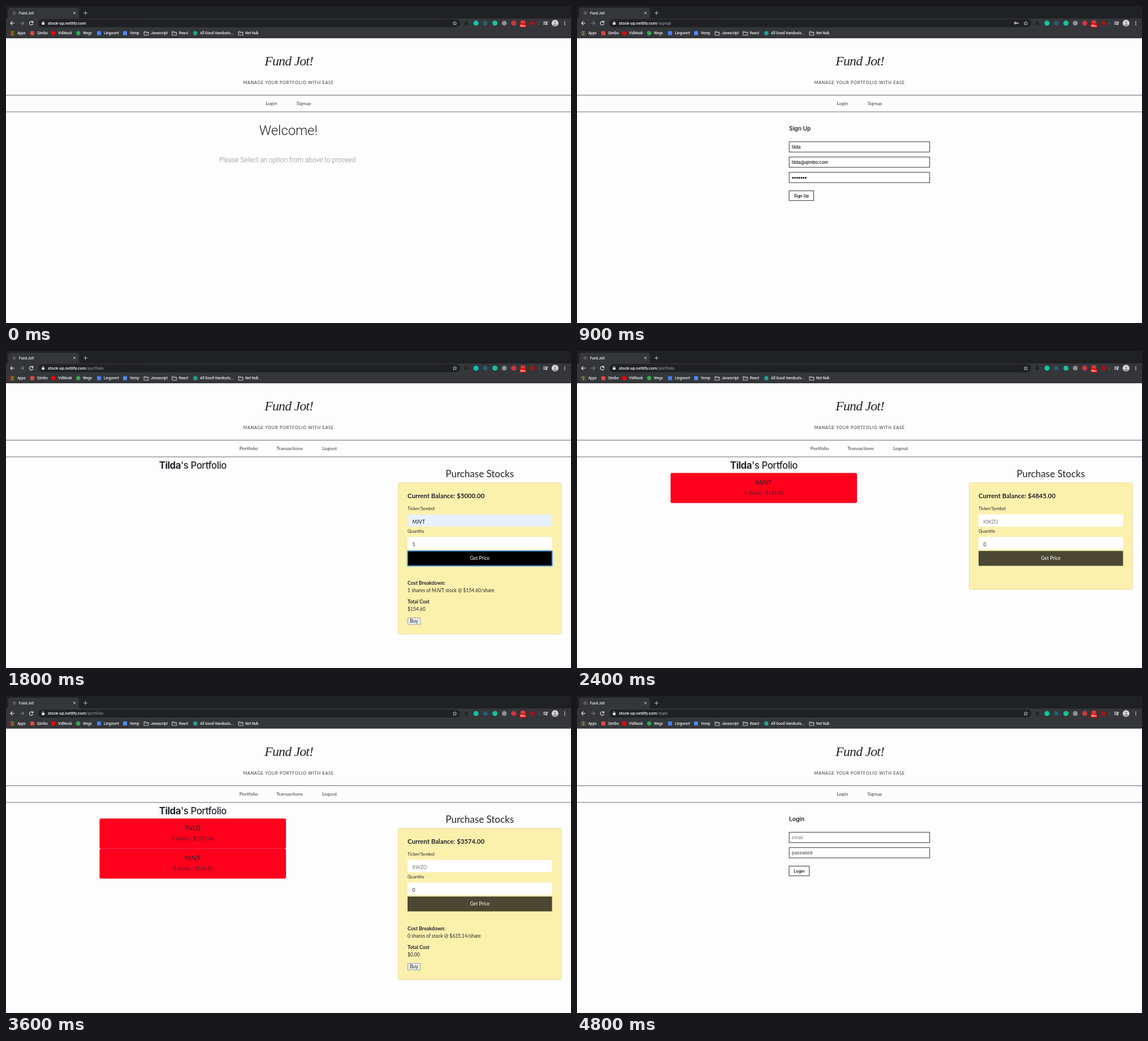
Recreate the animation shown at these times as an HTML page. Size 999x560 px, loop 5.1 s.

```html
<!DOCTYPE html>
<html lang="en">
<head>
<meta charset="utf-8">
<title>Fund Jot!</title>
<style>
  html, body { margin: 0; width: 100%; height: 100%; overflow: hidden; background: #fdfdfd; }
  svg { display: block; width: 999px; height: 560px; }
  text { white-space: pre; }
  .ui { font-family: Roboto, sans-serif; }
  .sf { font-family: Inter, sans-serif; }
  .av { font-family: Lato, sans-serif; }
  .title { font-family: "Liberation Serif", serif; font-style: italic; letter-spacing: -.8px; }
  .tag { font-family: Lato, sans-serif; letter-spacing: .85px; }
  .nav { font-family: Lato, sans-serif; letter-spacing: .1px; }
  .head { font-family: Inter, sans-serif; letter-spacing: -.4px; }
</style>
</head>
<body>
<svg id="stage" viewBox="0 0 999 560"></svg>
<script>
const INK = '#212529', MID = 499.3;
const USER = 'Tilda', MAIL = 'tilda@qimbo.com', APP = 'Fund Jot!';
const FIRST = 'MJVT', SECOND = 'TVLO', HINT = 'KWZO';
const HOST = 'stock-up.netlify.com';

const text = (x, y, s, size, cls, fill = INK, more = '') =>
  `<text x="${x}" y="${y}" font-size="${size}" class="${cls}" fill="${fill}" ${more}>${s}</text>`;
const center = (x, y, s, size, cls, fill, more = '') =>
  text(x, y, s, size, cls, fill, 'text-anchor="middle" ' + more);
const rect = (x, y, w, h, fill, more = '') =>
  `<rect x="${x}" y="${y}" width="${w}" height="${h}" fill="${fill}" ${more}/>`;
const dot = (x, y, r, fill) => `<circle cx="${x}" cy="${y}" r="${r}" fill="${fill}"/>`;
const line = (d, stroke, width = 1) =>
  `<path d="${d}" fill="none" stroke="${stroke}" stroke-width="${width}"/>`;
const shift = (dy, s) => `<g transform="matrix(1 0 0 1 0 ${dy})">${s}</g>`;
const bold = w => `font-weight="${w}"`;

function tabStrip() {
  return rect(0, 0, 999, 22, '#202124') +
    '<path d="M1 22q3 0 3-3V7q0-4 4-4H125q4 0 4 4v12q0 3 3 3z" fill="#35363a"/>' +
    dot(14.5, 12.4, 3.2, '#55575b') +
    text(23, 14.5, APP, 6.3, 'ui', '#e8eaed', bold(500)) +
    line('M119 10.3l4 4m0-4l-4 4', '#e8eaed', .9) +
    line('M137 12.3h7m-3.5-3.5v7', '#c4c7ca', .9);
}

function bookmark(x, label, color, shape) {
  const icon = shape === 'folder'
    ? line(`M${x} 45h3l1 1.2h4v5.3h-8z`, '#d5d7da', .9) + line(`M${x} 47.2h8`, '#d5d7da', .7)
    : shape === 'square' ? rect(x, 44.5, 7, 7, color, 'rx="1"') : dot(x + 3.7, 48, 3.8, color);
  return icon + text(x + 12, 50.3, label, 6.4, 'ui', '#e8eaed', bold(500));
}

function toolbar(path, key) {
  let s = rect(0, 21, 999, 36, '#35363a') + rect(57, 23.3, 746, 14.2, '#202124', 'rx="7.1"');
  s += line('M15 30.2H8m3.2-3.3L8 30.2l3.2 3.3', '#e8eaed', 1.1);
  s += line('M24.5 30.2h7m-3.2-3.3l3.2 3.3-3.2 3.3', '#7c7e82', 1.1);
  s += line('M47 28.2a3.2 3.2 0 1 0 .7 3M47.7 26.5v2.6h-2.6', '#e8eaed', 1.1);
  s += rect(63.3, 29.3, 4.8, 3.8, '#e8eaed', 'rx=".5"') + line('M64.3 29.5v-1a1.4 1.4 0 0 1 2.8 0v1', '#e8eaed', .8);
  s += text(74, 32.9, `<tspan font-weight="500" fill="#f1f3f4">${HOST}</tspan>${path}`, 7.4, 'ui', '#9aa0a6');
  if (key) s += dot(775, 30.2, 2.1, '#dadce0') + dot(775, 30.2, .8, '#202124') + line('M777 30.2h3.8m-1 0v1.6', '#dadce0', 1.2);
  s += line('M793.5 27l1 2.2 2.4.2-1.8 1.6.5 2.4-2.1-1.2-2.1 1.2.5-2.4-1.8-1.6 2.4-.2z', '#dadce0', .8);
  [[814, '#25272a', 3.5], [831, '#08c7a6', 4.5], [847.5, '#245d78', 4], [864.5, '#15c39a', 4.5],
   [881, '#8d8f92', 4.3], [897.7, '#c9363f', 4.5], [930.7, '#a90f16', 4]].forEach(([x, c, r]) => s += dot(x, 30.3, r, c));
  s += rect(910, 25.5, 8, 6, '#d93a32', 'rx="1"') + rect(908.3, 31, 11.3, 7, '#e60000', 'rx="1.5"');
  s += center(914, 36.7, '99+', 5.6, 'ui', '#fff', bold(700));
  s += line('M942.5 26.5v7.5', '#5b5d61', .8);
  s += line('M950 28h7m-7 2.2h7m-7 2.2h4.2', '#e8eaed', 1) + line('M956.6 32.5v-4.2h2', '#e8eaed', .9) + dot(955.8, 32.4, 1.2, '#e8eaed');
  s += dot(970.8, 30.3, 6, '#d9d6d4') + dot(970.8, 28.8, 1.9, '#a19a98') +
    '<path d="M967 34.8q0-3.6 3.8-3.6t3.8 3.6q-3.8 3-7.6 0z" fill="#a19a98"/>';
  for (let i = -1; i < 2; i++) s += dot(988, 30.3 + i * 2.6, .85, '#e8eaed');
  const hues = ['#ea4335', '#fbbc05', '#34a853', '#4285f4'];
  for (let i = 0; i < 9; i++) s += rect(7.5 + i % 3 * 2.7, 44.6 + (i / 3 | 0) * 2.7, 1.7, 1.7, hues[(i + (i / 3 | 0)) % 4]);
  s += text(20, 50.3, 'Apps', 6.4, 'ui', '#e8eaed', bold(500));
  s += bookmark(43, 'Qimbo', '#dd4b3e', 'square') + bookmark(80, 'VidNook', '#f00000') +
    bookmark(124, 'Wegs', '#34a853') + bookmark(161, 'Lingovert', '#4285f4', 'square') +
    bookmark(207, 'Vemp', '#4a8df5', 'square') + bookmark(244, 'Javascript', '', 'folder') +
    bookmark(293.7, 'React', '', 'folder') + bookmark(331, 'All Good Handouts...', '#23a08f') +
    bookmark(411, 'Net Nub', '', 'folder');
  return s;
}

function header(member, hover) {
  let s = center(500.2, 104.5, APP, 23.8, 'title') +
    center(MID + .4, 138.4, 'MANAGE YOUR PORTFOLIO WITH EASE', 7.2, 'tag', '#333');
  if (hover) s += rect(461, 157.5, 82, 29.5, '#96edd2') + line('M461.3 158v29m81.4 0v-29', '#6fae9b', .7);
  s += line('M0 157.5H999M0 187H999', '#55595c', .9);
  const links = member ? [[429.2, 'Portfolio'], [501.6, 'Transactions'], [572, 'Logout']]
                       : [[469.3, 'Login'], [526.5, 'Signup']];
  for (const [x, label] of links) {
    const on = hover === label;
    s += center(x, 175, label, 8.4, 'nav', on ? '#0056b3' : '#333', on ? 'text-decoration="underline"' : '');
  }
  return s;
}

const welcome = () => header() +
  center(MID, 228, 'Welcome!', 23.8, 'ui', INK, bold(300)) +
  center(499, 276.3, 'Please Select an option from above to proceed.', 11.9, 'ui', '#8a8d90', bold(300));

// A field is [text, colour, weight]; a number draws that many password dots.
function form(name, fields, buttonWidth) {
  let s = header() + text(375, 219.8, name, 10.2, 'sf', INK, bold(600)), y = 239.8;
  for (const [value, color, weight] of fields) {
    s += rect(375.2, y, 248.4, 18.2, '#fff', 'stroke="#333" stroke-width="1"');
    if (typeof value === 'number')
      for (let i = 0; i < value; i++) s += dot(381.7 + i * 3.8, y + 9.8, 1.5, '#111');
    else s += text(379.8, y + 11.9, value, 7.7, 'sf', color, bold(weight));
    y += 27;
  }
  y += 5.7;
  return s + rect(375, y, buttonWidth, 17.2, '#fff', 'stroke="#333" stroke-width="1"') +
    center(375 + buttonWidth / 2, y + 11.2, name, 7.1, 'sf', '#111', bold(600));
}

function card(x, y, w, fill, cls, title, note, titleSize, noteSize) {
  const mid = x + w / 2;
  return rect(x, y, w, 52.8, fill, 'rx="2.4" stroke="#000" stroke-opacity=".16" stroke-width=".6"') +
    center(mid, y + 20.4, title, titleSize, cls, INK, bold(500)) +
    center(mid, y + 38.8, note, noteSize, cls, INK, cls === 'av' ? 'opacity=".8"' : '');
}

const owned = (y, ticker, note) => card(165.5, y, 329.5, '#ff001d', 'av', ticker, note, 10.5, 8.6);
const heading = (x, what) =>
  center(x, 207.8, `<tspan font-weight="700">${USER}</tspan>'s ${what}`, 16.7, 'head', INK, bold(500));

function portfolio({ balance, ticker, count = 0, price, total, holdings = [] }) {
  let s = header(true) + heading(330.3, 'Portfolio');
  holdings.forEach(([t, note], i) => s += owned(215.6 + i * 53, t, note));
  s += center(837.7, 223.3, 'Purchase Stocks', 17, 'av');
  s += rect(693.5, 232.8, 288.7, price ? 267.4 : 188.4, '#fcf0ad', 'rx="2.4" stroke="#e4d9a4" stroke-width=".8"');
  s += text(710, 260.4, `Current Balance: $${balance}.00`, 11.4, 'av', INK, bold(700));
  s += text(710, 281.3, 'Ticker/Symbol', 7.6, 'av') + text(710, 321.4, 'Quantity', 7.6, 'av');
  s += rect(710, 288.5, 255.5, 21.8, ticker ? '#e8f0fe' : '#fff', 'rx="1"') + rect(710, 328.6, 255.5, 21.8, '#fff', 'rx="1"');
  s += text(718.4, 305, ticker || HINT, 8.5, 'av', ticker ? '#111' : '#777') + text(718.4, 345, count, 8.5, 'av');
  s += ticker ? rect(709.8, 353, 256, 26.8, '#000', 'rx="1.5" stroke="#5aa0e6" stroke-width="2"')
              : rect(710, 353.2, 255.5, 26.2, '#4a4733', 'rx="1"');
  s += center(837.7, 369, 'Get Price', 8.5, 'av', '#fff');
  if (!price) return s;
  return s + text(710, 413.3, 'Cost Breakdown:', 8.8, 'av', INK, bold(700)) +
    text(710, 425.7, `${count} shares of ${ticker ? ticker + ' ' : ''}stock @ $${price}/share`, 8.5, 'av') +
    text(710, 446.4, 'Total Cost', 8.7, 'av', INK, bold(700)) + text(710, 458.8, '$' + total, 8.5, 'av') +
    rect(710.4, 471.6, 22, 11.4, '#efefef', 'stroke="#8b8b8b" stroke-width=".8"') +
    center(721.4, 480, 'Buy', 8.6, 'av');
}

const transactions = () => header(true, 'Transactions') + heading(499.6, 'Transactions') +
  [[`BUY (${FIRST})`, '1 shares @ $154.6'], [`BUY (${SECOND})`, '2 shares @ $635.215']]
    .map(([t, note], i) => card(250, 215.6 + i * 53, 499.6, '#00ffff', 'sf', t, note, 10.2, 7.8)).join('') +
  '<path d="M0 550H330q3 0 3 3v7H0z" fill="#35363a"/>' +
  text(2, 557.6, `https://${HOST}/transactions`, 6.3, 'ui', '#bdc1c6');

const held = [FIRST, '1 shares : $154.42'];
const empty = '#8a8a8a';
// Start time, address path, page, page offset, key icon
const scenes = [
  [0, '', welcome()],
  [600, '/signup', form('Sign Up', [['username', empty, 500], ['email', empty, 500], ['password', empty, 600]], 43.5)],
  [900, '/signup', form('Sign Up', [[USER.toLowerCase(), '#111', 500], [MAIL, '#111', 500], [7]], 43.5), 0, true],
  [1200, '/portfolio', portfolio({ balance: 5000 })],
  [1800, '/portfolio', portfolio({ balance: 5000, ticker: FIRST, count: 1, price: '154.60', total: '154.60' })],
  [2400, '/portfolio', portfolio({ balance: 4845, holdings: [held] })],
  [3000, '/portfolio', portfolio({ balance: 4845, ticker: SECOND, count: 2, price: '635.215', total: '1270.43', holdings: [held] })],
  [3600, '/portfolio', portfolio({ balance: 3574, price: '635.14', total: '0.00',
    holdings: [[SECOND, '2 shares : $1271.66'], held] }), 1],
  [4200, '/transactions', transactions()],
  [4800, '/login', form('Login', [['email', empty, 500], ['password', '#666', 600]], 35.6), 1]
];

const stage = document.getElementById('stage');
let shown;
function draw(now) {
  const t = now % 5100;
  const scene = scenes.findLast(([start]) => t >= start);
  if (scene !== shown) {
    const [, path, page, dy = 0, key] = shown = scene;
    stage.innerHTML = rect(0, 0, 999, 560, '#fdfdfd') + shift(dy, page) +
      shift(dy * .6, toolbar(path, key)) + tabStrip();
  }
}
const begin = performance.now();
function tick() {
  draw(performance.now() - begin);
  requestAnimationFrame(tick);
}
tick();
</script>
</body>
</html>
```
